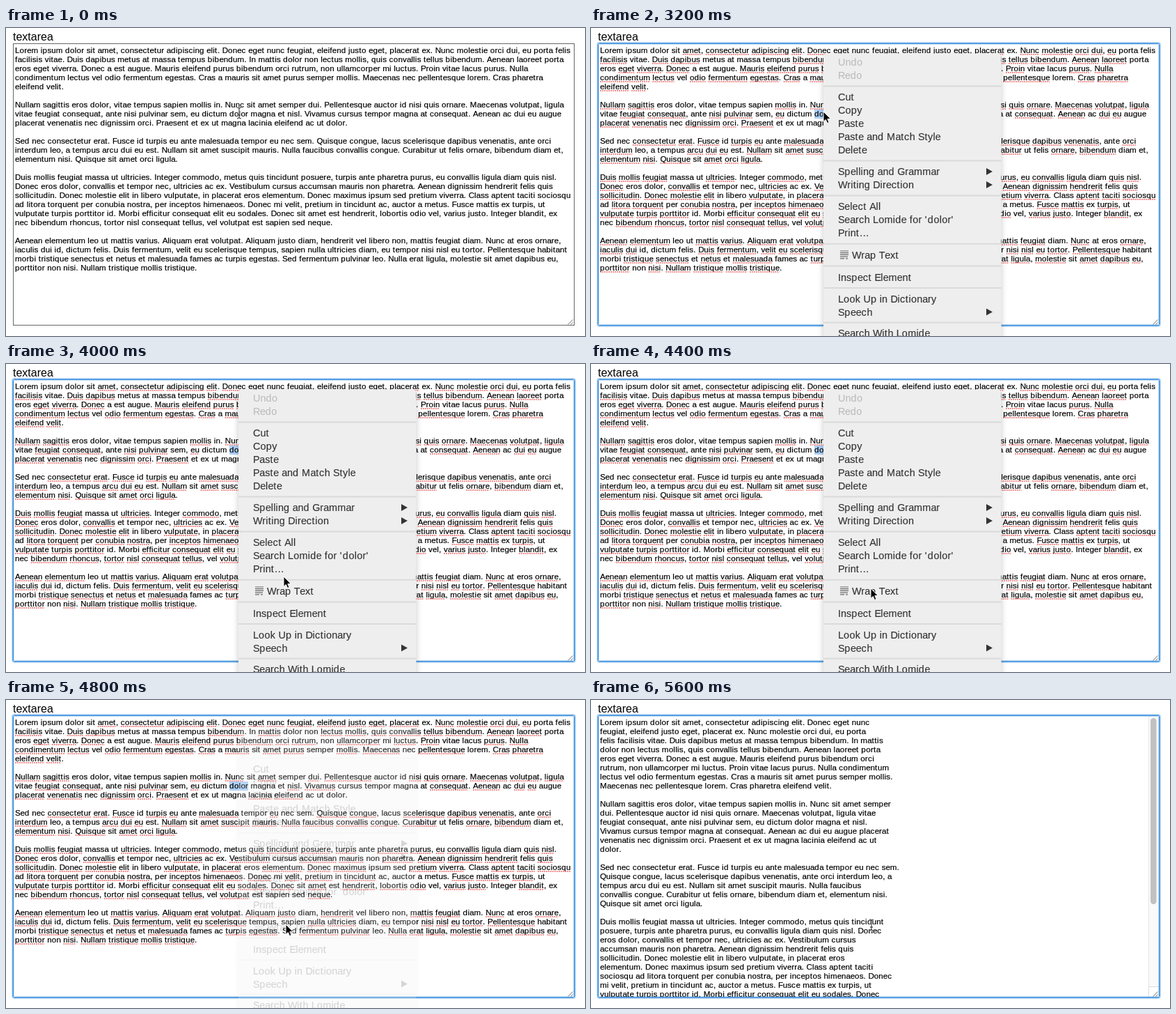
Write an HTML page that moves like this. It is 832x442 px and loops after 7.6 s.

```html
<!DOCTYPE html>
<html lang="en">
<head>
<meta charset="utf-8">
<title>Wrap text in a textarea</title>
<style>
  html, body { margin: 0; width: 100%; height: 100%; overflow: hidden; background: #fff; }
  svg { display: block; }
  text { font-family: "Liberation Sans", Arial, sans-serif; white-space: pre; }
  .body { font-size: 11.6px; stroke: #000; stroke-width: .2px; }
  .menu text { font-size: 14.4px; fill: #343434; stroke: #343434; stroke-width: .15px; }
  .menu .off { fill: #b9b9b9; stroke: none; }
  .panel { fill: #eeeeee; filter: drop-shadow(0 3px 4px rgba(0, 0, 0, .22)); }
  .typo { stroke: #ea4340; stroke-width: 1.7; stroke-dasharray: 2 1; opacity: .8; }

  .idle, .focus, .marks, .wide, .narrow, .menu, .arrow, .beam1, .beam2 {
    animation: 7600ms step-end infinite;
  }
  .idle, .beam1 { animation-name: before; }
  .focus { animation-name: after; }
  .marks { animation-name: marked; }
  .wide { animation-name: wide; }
  .narrow { animation-name: narrow; }
  .menu { animation-name: menu; }
  .arrow { animation-name: arrow; }
  .beam2 { animation-name: beam; }

  @keyframes before { 0% { opacity: 1 } 42.105%, 100% { opacity: 0 } }
  @keyframes after { 0% { opacity: 0 } 42.105%, 100% { opacity: 1 } }
  @keyframes marked { 0% { opacity: 0 } 42.105% { opacity: 1 } 73.684%, 100% { opacity: 0 } }
  @keyframes wide { 0% { opacity: 1 } 73.684%, 100% { opacity: 0 } }
  @keyframes narrow { 0% { opacity: 0 } 73.684%, 100% { opacity: 1 } }
  @keyframes menu {
    0% { opacity: 0 } 42.105% { opacity: 1 } 63.157% { opacity: .2 } 65.789%, 100% { opacity: 0 }
  }
  @keyframes arrow {
    0% { opacity: 0; transform: translate(334px, 120px) }
    42.105% { opacity: 1; transform: translate(334px, 120px) }
    47.368% { opacity: 1; transform: translate(340px, 160px) }
    50% { opacity: 1; transform: translate(372px, 230px) }
    52.631% { opacity: 1; transform: translate(399px, 305px) }
    55.263% { opacity: 1; transform: translate(402px, 324px) }
    57.894% { opacity: 1; transform: translate(402px, 322px) }
    68.421%, 100% { opacity: 0; transform: translate(402px, 322px) }
  }
  @keyframes beam { 0% { opacity: 0 } 68.421%, 100% { opacity: 1 } }
</style>
</head>
<body>
<svg id="stage" width="832" height="442" viewBox="0 0 832 442">
  <defs>
    <clipPath id="box"><rect x="11" y="23" width="805" height="403"/></clipPath>
    <path id="bar" d="M-3 -8 Q0 -8 0 -6 Q0 -8 3 -8 M0 -6 V6 M-3 8 Q0 8 0 6 Q0 8 3 8 M-2 3 H2"/>
    <g id="beam" fill="none">
      <use href="#bar" stroke="#fff" stroke-width="2.4" opacity=".7"/>
      <use href="#bar" stroke="#222"/>
    </g>
  </defs>
  <text x="10" y="18" font-size="16">textarea</text>

  <g clip-path="url(#box)">
    <rect class="marks" x="321" y="117" width="27" height="13" fill="#acd0f8"/>
    <g class="wide body" id="wide"></g>
    <g class="marks" id="marks"></g>
    <g class="narrow">
      <g class="body" id="narrow"></g>
      <rect x="801" y="23" width="15" height="404" fill="#fafafa"/>
      <path d="M801.5 23 V427" stroke="#e6e6e6"/>
      <rect x="804" y="26" width="8.5" height="267" rx="4.25" fill="#c1c1c1"/>
      <rect x="801.5" y="411.5" width="15" height="15" fill="#fff" stroke="#dcdcdc"/>
    </g>
    <path d="M807.5 425.5 L814.5 418.5 M811.5 425.5 L814.5 422.5" stroke="#777"/>
  </g>

  <rect class="idle" x="10.5" y="22.5" width="806" height="404" fill="none" stroke="#666"/>
  <g class="focus" fill="none" stroke="#4293dd">
    <rect x="8.5" y="20.5" width="810" height="408" rx="3" opacity=".3"/>
    <rect x="9.5" y="21.5" width="808" height="406" rx="2" opacity=".75"/>
    <rect x="10.5" y="22.5" width="806" height="404" rx="1"/>
    <rect x="11.5" y="23.5" width="804" height="402" opacity=".25"/>
  </g>

  <g class="menu" id="menu">
    <rect class="panel" x="334" y="36.5" width="255.5" height="430" rx="5"/>
    <path d="M358 320 H370 M358 322.7 H370 M358 325.4 H370 M358 328.1 H369 M358 330.8 H364 M366 330.8 H369" stroke="#686868" stroke-width="1.2"/>
  </g>

  <use class="beam1" href="#beam" x="335" y="122"/>
  <use class="beam2" href="#beam" x="403" y="323"/>
  <path class="arrow" d="M0 0 V14.5 L3.3 11.4 L5.6 16.6 L8 15.5 L5.8 10.5 H10.4 Z" fill="#000" stroke="#fff" stroke-linejoin="round"/>
</svg>
<script>
const copy = `Lorem ipsum dolor sit amet, consectetur adipiscing elit. Donec eget nunc feugiat, eleifend justo eget, placerat ex. Nunc molestie orci dui, eu porta felis
facilisis vitae. Duis dapibus metus at massa tempus bibendum. In mattis dolor non lectus mollis, quis convallis tellus bibendum. Aenean laoreet porta
eros eget viverra. Donec a est augue. Mauris eleifend purus bibendum orci rutrum, non ullamcorper mi luctus. Proin vitae lacus purus. Nulla
condimentum lectus vel odio fermentum egestas. Cras a mauris sit amet purus semper mollis. Maecenas nec pellentesque lorem. Cras pharetra
eleifend velit.

Nullam sagittis eros dolor, vitae tempus sapien mollis in. Nunc sit amet semper dui. Pellentesque auctor id nisi quis ornare. Maecenas volutpat, ligula
vitae feugiat consequat, ante nisi pulvinar sem, eu dictum dolor magna et nisl. Vivamus cursus tempor magna at consequat. Aenean ac dui eu augue
placerat venenatis nec dignissim orci. Praesent et ex ut magna lacinia eleifend ac ut dolor.

Sed nec consectetur erat. Fusce id turpis eu ante malesuada tempor eu nec sem. Quisque congue, lacus scelerisque dapibus venenatis, ante orci
interdum leo, a tempus arcu dui eu est. Nullam sit amet suscipit mauris. Nulla faucibus convallis congue. Curabitur ut felis ornare, bibendum diam et,
elementum nisi. Quisque sit amet orci ligula.

Duis mollis feugiat massa ut ultricies. Integer commodo, metus quis tincidunt posuere, turpis ante pharetra purus, eu convallis ligula diam quis nisl.
Donec eros dolor, convallis et tempor nec, ultricies ac ex. Vestibulum cursus accumsan mauris non pharetra. Aenean dignissim hendrerit felis quis
sollicitudin. Donec molestie elit in libero vulputate, in placerat eros elementum. Donec maximus ipsum sed pretium viverra. Class aptent taciti sociosqu
ad litora torquent per conubia nostra, per inceptos himenaeos. Donec mi velit, pretium in tincidunt ac, auctor a metus. Fusce mattis ex turpis, ut
vulputate turpis porttitor id. Morbi efficitur consequat elit eu sodales. Donec sit amet est hendrerit, lobortis odio vel, varius justo. Integer blandit, ex
nec bibendum rhoncus, tortor nisl consequat tellus, vel volutpat est sapien sed neque.

Aenean elementum leo ut mattis varius. Aliquam erat volutpat. Aliquam justo diam, hendrerit vel libero non, mattis feugiat diam. Nunc at eros ornare,
iaculis dui id, dictum felis. Duis fermentum, velit eu scelerisque tempus, sapien nulla ultricies diam, eu tempor nisi nisl eu tortor. Pellentesque habitant
morbi tristique senectus et netus et malesuada fames ac turpis egestas. Sed fermentum pulvinar leo. Nulla erat ligula, molestie sit amet dapibus eu,
porttitor non nisi. Nullam tristique mollis tristique.`;

// Words the spelling checker accepts
const known = new Set(('lorem ipsum dolor sit in non a id mi magna vitae ante sed et ac at ut semper ' +
  'tempus est per diam leo massa eros ex ad porta felis nec sem libero auctor integer class ' +
  'cursus tempor sapien morbi vel augue lacus metus fames dictum habitant').split(' '));

// Letter widths in 1/1000 em, grouped
const groups = {
  222: 'ijl', 259: 'I', 278: " .,'", 296: 'f', 315: 't', 333: 'r', 480: 'z', 500: 'svy',
  518: 'xk', 537: 'ace', 556: 'hnuL', 574: 'goFT', 593: 'bdpq', 611: 'EVXZ', 648: 'APSY',
  685: 'BR', 704: 'D', 722: 'CHNU', 758: 'w', 760: 'OGQ', 853: 'm', 871: 'M', 926: 'W', 1000: '…'
};
const widths = {};
for (const [w, letters] of Object.entries(groups)) for (const c of letters) widths[c] = w / 1000;

const $ = id => document.getElementById(id);

function add(parent, tag, attrs, text = '') {
  const el = document.createElementNS('http://www.w3.org/2000/svg', tag);
  for (const k in attrs) el.setAttribute(k, attrs[k]);
  el.textContent = text;
  parent.append(el);
}

// Left edge of every letter, plus the end of the line
function edges(str, x, size, track) {
  const xs = [x];
  for (const c of str) xs.push(x += (widths[c] ?? .556) * size + track);
  return xs;
}

function write(parent, str, x, y, size, track, cls = '') {
  const xs = edges(str, x, size, track);
  const list = xs.slice(0, -1).map(v => v.toFixed(2)).join(' ');
  add(parent, 'text', { x: list, y, class: cls }, str);
  return xs;
}

function writeLine(parent, str, row) {
  return str ? write(parent, str, 13, 36 + row * 13, 11, .385) : [];
}

function underline(str, xs, row) {
  const y = 38 + row * 13;
  for (const m of str.matchAll(/[a-z]+/gi)) {
    if (known.has(m[0].toLowerCase())) continue;
    add($('marks'), 'line', {
      class: 'typo', x1: xs[m.index], x2: xs[m.index + m[0].length] - .4, y1: y, y2: y
    });
  }
}

function wrap(par, limit) {
  const lines = [''];
  for (const word of par.split(/\s+/)) {
    const last = lines[lines.length - 1];
    const next = last ? last + ' ' + word : word;
    if (next.length > limit) lines.push(word);
    else lines[lines.length - 1] = next;
  }
  return lines;
}

copy.split('\n').forEach((str, row) => underline(str, writeLine($('wide'), str, row), row));

copy.split('\n\n').flatMap(par => [...wrap(par, 79), '']).slice(0, 31)
  .forEach((str, row) => writeLine($('narrow'), str, row));

const items = [
  ['Undo', 54, 'off'], ['Redo', 73, 'off'],
  ['Cut', 104], ['Copy', 123], ['Paste', 142], ['Paste and Match Style', 161], ['Delete', 180],
  ['Spelling and Grammar', 211, 'sub'], ['Writing Direction', 230, 'sub'],
  ['Select All', 261], ["Search Lomide for 'dolor'", 280], ['Print…', 299],
  ['Wrap Text', 330.5], ['Inspect Element', 362.5],
  ['Look Up in Dictionary', 393.5], ['Speech', 412.5, 'sub'], ['Search With Lomide', 443]
];
const menu = $('menu');
items.forEach(([label, y, kind], i) => {
  write(menu, label, label === 'Wrap Text' ? 375 : 355, y, 14, .3, kind);
  if (kind === 'sub') add(menu, 'path', { d: `M568 ${y - 10} l9 5 l-9 5 z`, fill: '#343434' });
  const next = items[i + 1];
  if (next && next[1] - y > 25) {
    add(menu, 'rect', { x: 334, y: (y + next[1]) / 2 - 6, width: 255.5, height: 2, fill: '#dadada' });
  }
});
</script>
</body>
</html>
```
